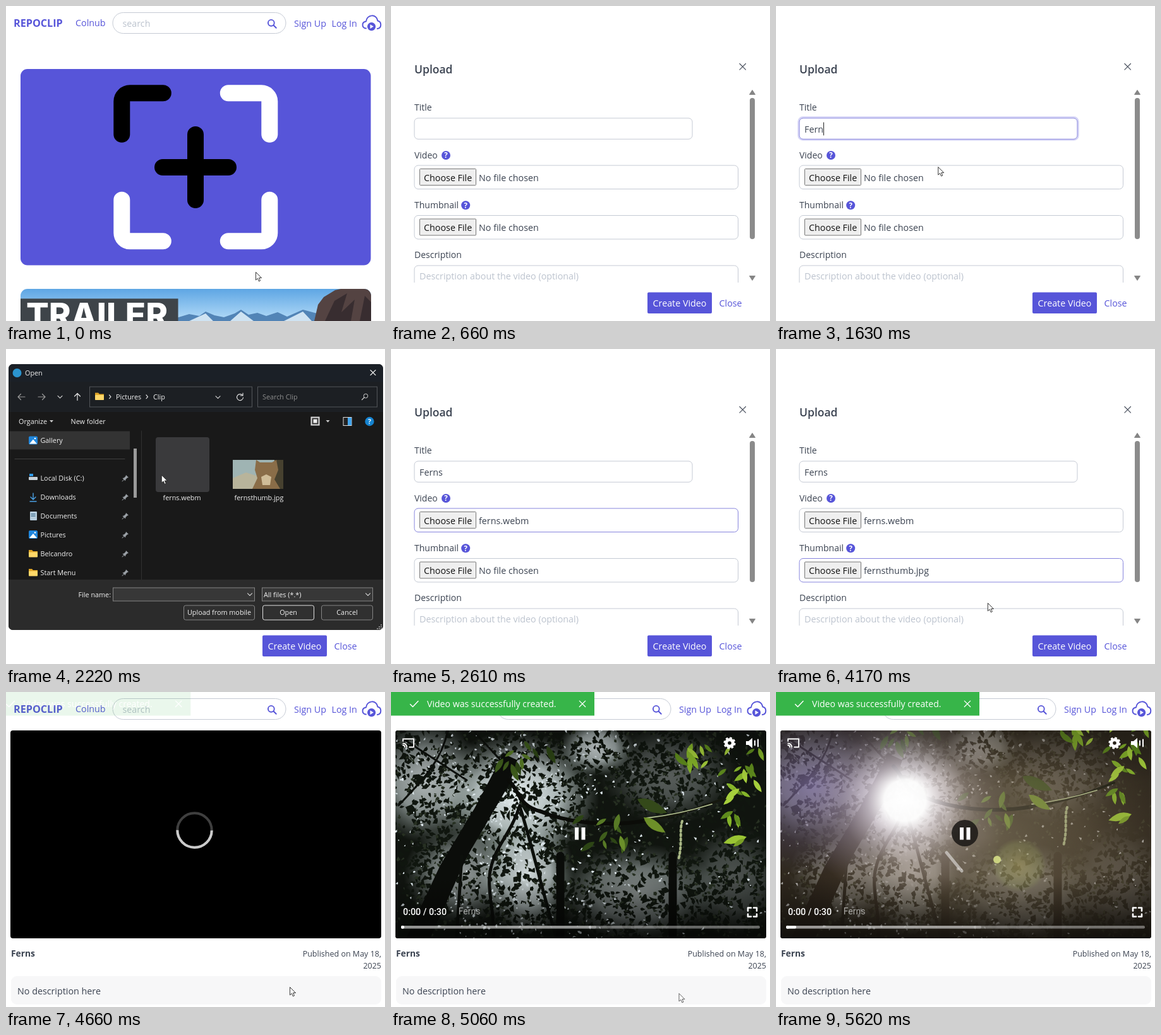
An HTML page that plays this animation: 600x500 px, repeating every 5710 ms.

```html
<!DOCTYPE html>
<html lang="en">
<head>
<meta charset="utf-8">
<title>Video upload</title>
<style>
html, body { margin: 0; width: 100%; height: 100%; overflow: hidden; background: #fff; }
svg { display: block; width: 600px; height: 500px; font: 14.3px "Open Sans", sans-serif; fill: #3b4351; }
text { white-space: pre; }
.link { fill: #5755d9; }
.hint { fill: #bcc3ce; }
.label { font-size: 14px; }
.line { fill: none; stroke-linecap: round; stroke-linejoin: round; }
.mid { text-anchor: middle; }
#dialog text { font-size: 10.8px; fill: #f2f2f2; }
#dialog .dim { fill: #8d8d8d; }
</style>
</head>
<body>
<svg id="stage" viewBox="0 0 600 500" xmlns="http://www.w3.org/2000/svg"></svg>
<script>
const LOOP = 5710;
const PURPLE = '#5755d9';
const TITLE = 'Ferns';
const VIDEO_FILE = 'ferns.webm';
const IMAGE_FILE = 'fernsthumb.jpg';

let seed = 11;
const rnd = () => (seed = (seed * 16807) % 2147483647) / 2147483647;

// Markup helpers
const text = (x, y, s, attrs = '') => `<text x="${x}" y="${y}" ${attrs}>${s}</text>`;
const rect = (x, y, w, h, fill, attrs = '') =>
  `<rect x="${x}" y="${y}" width="${w}" height="${h}" fill="${fill}" ${attrs}/>`;
const circle = (x, y, r, fill, attrs = '') => `<circle cx="${x}" cy="${y}" r="${r}" fill="${fill}" ${attrs}/>`;
const ellipse = (x, y, rx, ry, fill, attrs = '') =>
  `<ellipse cx="${x}" cy="${y}" rx="${rx}" ry="${ry}" fill="${fill}" ${attrs}/>`;
const shape = (d, fill, attrs = '') => `<path d="${d}" fill="${fill}" ${attrs}/>`;
const line = (d, color, width = 1, attrs = '') =>
  `<path class="line" d="${d}" stroke="${color}" stroke-width="${width}" ${attrs}/>`;
const group = (id, ...parts) => `<g id="${id}">${parts.join('')}</g>`;
const cross = (x, y, r, color, width) =>
  line(`M${x - r} ${y - r}l${2 * r} ${2 * r}m0 ${-2 * r}l${-2 * r} ${2 * r}`, color, width);
const stops = (...list) => list.map(([at, color, alpha = 1]) =>
  `<stop offset="${at}" stop-color="${color}" stop-opacity="${alpha}"/>`).join('');
const radial = (id, ...list) => `<radialGradient id="${id}">${stops(...list)}</radialGradient>`;
const vertical = (id, ...list) => `<linearGradient id="${id}" x2="0" y2="1">${stops(...list)}</linearGradient>`;

const defs = `<defs>
  <clipPath id="cardClip">${rect(23, 449, 555, 80, '#000', 'rx="11"')}</clipPath>
  <clipPath id="formClip">${rect(30, 130, 530, 309, '#000')}</clipPath>
  <clipPath id="videoClip">${rect(7, 61, 587, 330, '#000', 'rx="4"')}</clipPath>
  <clipPath id="dialogClip">${rect(4, 24, 593, 422, '#000', 'rx="7"')}</clipPath>
  <clipPath id="photoClip">${rect(359, 176, 80, 46, '#000')}</clipPath>
  ${vertical('sky', [0, '#5ea6e4'], [1, '#b5dcf8'])}
  ${vertical('shade', [0, '#000', .25], [.25, '#000', 0], [.7, '#000', 0], [1, '#000', .6])}
  ${radial('daylight', [0, '#e6eef0'], [.5, '#d3dfe0', .8], [1, '#9fb0aa', 0])}
  ${radial('sun', [0, '#fff'], [.2, '#fff', .97], [.36, '#f6eef8', .62], [.62, '#d9cbd6', .25], [1, '#bfb0c0', 0])}
  ${radial('haze', [0, '#7a6cae', .62], [1, '#5a4f80', 0])}
  ${radial('warmth', [0, '#a39578', .5], [.5, '#8f7f62', .36], [1, '#6b5840', 0])}
  ${radial('flare', [0, '#c9c05f', .3], [.8, '#a8b766', .2], [1, '#a8b766', 0])}
</defs>`;

// Site header and home page
const header = group('header',
  text(12, 33, 'REPOCLIP', 'class="link" font-size="16.2" font-weight="700"'),
  text(110, 32, 'Colnub', 'class="link"'),
  rect(169, 10.5, 274, 33, '#fff', 'rx="16.5" stroke="#c5cad4"'),
  text(184.5, 33, 'search', 'class="hint"'),
  circle(419.8, 26.8, 4.9, 'none', `stroke="${PURPLE}" stroke-width="1.9"`),
  line('M423.5 30.5l4.2 4.2', PURPLE, 2),
  text(456, 33, 'Sign Up', 'class="link"'),
  text(515.5, 33, 'Log In', 'class="link"'),
  line('M570 35.5C563 35 562.5 25.5 570 24.5C571 13 587 12 588.5 23.5C595 25 595 35 588 36', PURPLE, 2),
  circle(578.6, 32.6, 6.6, PURPLE), shape('M576.5 29.2v6.8l5.4-3.4z', '#fff'));

const corner = (sx, sy, color) =>
  line('M-117-52V-104.5A13 13 0 0 1-104-117.5H-51.5', color, 26,
    `transform="translate(300.3 255.8) scale(${sx} ${sy})"`);

const home = group('home',
  rect(23, 100, 554.5, 311.5, PURPLE, 'rx="11"'),
  corner(1, 1, '#000'), corner(-1, 1, '#fff'), corner(1, -1, '#fff'), corner(-1, -1, '#fff'),
  line('M248 256h104M300 204v104', '#000', 26),
  `<g clip-path="url(#cardClip)">`,
  rect(23, 449, 555, 51, 'url(#sky)'),
  shape('M270 495L290 489L306 492L316 485L330 491L345 494L362 488L372 482L384 490L398 487L412 492L430 486L445 493L470 482L500 490V500H270Z', '#5284b6'),
  shape('M290 500L316 488L328 500M355 500L372 485L392 500M440 500L470 485L484 500', '#cfe3f2'),
  shape('M488 500L494 474L503 462L521 451L530 449H578V500Z', '#544342'),
  shape('M505 500L520 468L540 456L531 486L552 466L546 500M560 500L568 460L578 470V500', '#382d30'),
  rect(23, 464.5, 249.5, 36, '#3e4449'),
  text(32, 510, 'TRAILER', 'fill="#fff" font-family="Inter, sans-serif" font-weight="800" font-size="53"'), '</g>');

// Upload form
const help = (x, y) => circle(x, y, 7, PURPLE) +
  text(x, y + 4.2, '?', 'class="mid" fill="#fff" font-size="11.5" font-weight="700"');
const label = (y, s) => text(37, y, s, 'class="label"');
const fileField = (id, y) =>
  rect(37, y, 512.5, 37.5, '#fff', `id="${id}Box" rx="6" stroke="#c5cad4"`) +
  rect(45.5, y + 5.5, 89, 26, '#efefef', 'stroke="#767676" rx="1"') +
  text(52, y + 24.5, 'Choose File', 'fill="#111"') + text(139, y + 24.5, '', `id="${id}Name"`);

const modal = group('modal',
  text(37, 107, 'Upload', 'font-size="17.5" font-weight="600"'),
  cross(556.7, 96.3, 4.8, '#4c5360', 1.2),
  rect(568, 146, 8, 224, '#8b8b8b', 'rx="4"'),
  shape('M572 133.5l4.5 7h-9zM572 435.5l4.5-7h-9z', '#858585', 'stroke="#858585" stroke-linejoin="round"'),
  label(166, 'Title'),
  rect(35.5, 176.5, 443, 36, 'none', 'id="titleRing" rx="7" stroke="#5755d9" stroke-opacity=".25" stroke-width="2.5"'),
  rect(37, 178, 440, 33.3, '#fff', 'id="titleBox" rx="6" stroke="#c5cad4"'),
  text(45, 201, '', 'id="titleText"'), line('M0 185v20', '#222', 1, 'id="caret"'),
  label(241.5, 'Video'), help(87, 237),
  label(321, 'Thumbnail'), help(118.2, 316.3),
  fileField('video', 253), fileField('thumb', 332.5),
  label(400, 'Description'),
  '<g clip-path="url(#formClip)">',
  rect(37, 412, 512.5, 70, '#fff', 'rx="6" stroke="#c5cad4"'),
  text(45, 434, 'Description about the video (optional)', 'class="hint"'), '</g>',
  rect(406, 454.5, 102, 33.5, PURPLE, 'rx="2"'),
  text(457, 476.5, 'Create Video', 'class="mid" fill="#fff"'),
  text(519.5, 476.5, 'Close', 'class="link"'));

// File dialog
const folder = (x, y) => shape(`M${x} ${y}h5l2 2h7v9h-14z`, '#e0a526') + rect(x, y + 3.5, 14, 8, '#ffd869', 'rx="1"');
const picture = (x, y) => rect(x, y, 14, 13, '#1f86dc', 'rx="2"') +
  shape(`M${x + 1} ${y + 12}l6-7l6 7z`, '#fff') + circle(x + 10, y + 3.5, 1.3, '#fff');
const pin = y => shape(`M190 ${y - 5}l4 4l-2 .5l-2.5 2.5l-.5 2.5l-2-2l-3 3l-.6-.6l3-3l-2-2l2.5-.5l2.5-2.5z`, '#9aa0a6');
const chevron = (x, y) => line(`M${x - 3.5} ${y - 1.7}l3.5 3.5l3.5-3.5`, '#d0d0d0', 1.2);
const outline = (x, y, w, h, fill, color, attrs = '') => rect(x + .5, y + .5, w, h, fill, `stroke="${color}" ${attrs}`);
const button = (x, w, name, color = '#858585') =>
  outline(x, 406.5, w, 23, '#303030', color, 'rx="3"') + text(x + w / 2 + .5, 422, name, 'class="mid"');

const sideItems = [
  ['Local Disk (C:)', rect(36, 203, 14, 5, '#c9d1d8', 'rx="1"') + rect(37, 198, 6, 4, '#2f9bec')],
  ['Downloads', line('M43 229v10m-4-4l4 4l4-4M38 242h10', '#4ba3e8', 1.4)],
  ['Documents', rect(38, 258, 11, 14, '#b6cddd', 'rx="1"') + line('M40 262h6m-6 3h6', '#4b7896', 1.5)],
  ['Pictures', picture(36, 288)],
  ['Belcandro', folder(36, 319)],
  ['Start Menu', folder(36, 349)],
];

const dialog = group('dialog', '<g clip-path="url(#dialogClip)">',
  rect(4, 24, 593, 422, '#191919'), rect(4, 24, 593, 76, '#1b2027'), rect(4, 52, 593, 48, '#1c1f23'),
  circle(17.5, 38, 7, '#2b94cf'), text(30, 42, 'Open'), cross(581, 37.5, 4, '#eee', 1.1),
  line('M30 76h-11m4.5-4.5l-4.5 4.5l4.5 4.5M51 76h11m-4.5-4.5l4.5 4.5l-4.5 4.5', '#9a9a9a', 1.2),
  chevron(85.5, 76), line('M113 81.5v-11m-4.5 4.5l4.5-4.5l4.5 4.5', '#e8e8e8', 1.2),
  outline(132, 59.5, 257, 32, 'none', '#53565a'), folder(141, 69.5),
  line('M163.5 73l2.5 2.8l-2.5 2.8M222 73l2.5 2.8l-2.5 2.8', '#ddd', 1.2),
  text(174, 79.5, 'Pictures'), text(233, 79.5, 'Clip'), chevron(335.5, 76.5),
  line('M374.5 73.5A5 5 0 1 0 375.5 77M375 70v4h-4', '#ddd', 1.2),
  outline(398, 59.5, 189, 32, 'none', '#53565a'), text(406, 80, 'Search Clip', 'class="dim"'),
  circle(569.5, 74.5, 3.3, 'none', 'stroke="#ccc"'), line('M567 77l-3.5 3.5', '#ccc', 1.2),
  text(20, 119, 'Organize'), shape('M69 113h6l-3 3.5z', '#ccc'), text(102.5, 119, 'New folder'),
  rect(483.5, 108.5, 12, 12, '#333', 'stroke="#ddd" stroke-width="2"'), rect(486.5, 111.5, 6, 6, '#eee'),
  shape('M506.5 113h6l-3 3.5z', '#ccc'),
  rect(534, 108.5, 13, 13, '#222', 'stroke="#ddd"'), rect(541, 109, 6, 12, '#42a5ed'),
  circle(575.5, 115, 7.2, '#1583d0'), text(575.5, 119, '?', 'class="mid" font-weight="700"'),
  rect(5.5, 130.5, 190.5, 29, '#333'), picture(36, 138.5), text(54.5, 149, 'Gallery'),
  line('M14 174.5h174', '#414141'), rect(202, 158, 5, 78, '#9a9a9a'), line('M214.5 130v236', '#303030'),
  ...sideItems.map(([name, icon], i) => icon + text(54.5, 209 + 30 * i, name) + pin(205 + 30 * i)),
  outline(229, 135.5, 98, 109, '#4c4c4c', '#858585', 'id="pickVideo"'),
  outline(351, 135.5, 98, 109, '#4c4c4c', '#858585', 'id="pickImage"'),
  rect(237, 140, 85, 87, '#3a3a3c', 'rx="4"'),
  text(278.5, 240, VIDEO_FILE, 'class="mid"'), text(400.5, 240, IMAGE_FILE, 'class="mid"'),
  '<g clip-path="url(#photoClip)">', rect(359, 176, 80, 46, '#9fb4b3'),
  shape('M359 205L380 196L399 202V222H359Z', '#b8b49b'), shape('M425 176H439V222H422Z', '#47412f'),
  shape('M396 176L402 180H421L428 176L431 192L425 207L434 222H390L398 205L394 192Z', '#8a6d48'),
  shape('M404 203L412 199L420 203L418 216H406Z', '#d0bd98'), '</g>',
  rect(4, 366, 593, 80, '#2b2b2b'),
  text(114.5, 393.5, 'File name:'),
  outline(169, 378.5, 224, 21, '#373737', '#858585'), text(172.5, 393.5, '', 'id="fileName"'), chevron(386, 389.5),
  outline(405, 378.5, 175, 21, '#373737', '#858585'), text(408, 393.5, 'All files (*.*)'), chevron(573, 389.5),
  button(281, 112, 'Upload from mobile'), button(406, 81, 'Open', '#e0e0e0'), button(499, 81, 'Cancel'),
  ...[0, 1, 2].flatMap(r => [0, 1, 2].filter(c => c + r > 1).map(c => rect(587 + 3 * c, 437 + 3 * r, 2, 2, '#8a8a8a'))),
  '</g>');

// Forest clip: daylight broken up by small dark foliage, then trunks, a branch and leaves
function foliage(count, size, color, density = () => 1) {
  let d = '';
  for (let i = 0; i < count; i++) {
    const x = 7 + rnd() * 587, y = 61 + rnd() * 330;
    if (rnd() > density(x, y)) continue;
    for (let k = 0; k < 5; k++) {
      const a = k * Math.PI / 2.5, r = size * (.3 + rnd() * rnd() * 1.7);
      d += `${k ? 'L' : 'M'}${(x + r * Math.cos(a)).toFixed(1)} ${(y + r * Math.sin(a)).toFixed(1)}`;
    }
    d += 'Z';
  }
  return shape(d, color);
}
const wave = (x, y) => Math.sin(x / 17 + Math.sin(y / 23) * 2) * Math.cos(y / 15 + Math.sin(x / 31) * 2);
const clumps = (x, y) => .6 + .4 * wave(x, y);
const gaps = (x, y) => (.15 + .85 * Math.exp(-(((x - 170) / 190) ** 2))) * (.45 - .45 * wave(x, y));

const leaf = (x, y, angle, size, color) =>
  shape(`M0 0Q${size * .45} ${size * .36} ${size} 0Q${size * .4} ${-size * .3} 0 0`, color,
    `transform="translate(${x} ${y}) rotate(${angle})"`);
const leafCluster = (x, y, w, h, count, size, colors) => Array.from({ length: count }, (_, i) =>
  leaf(x + (rnd() - .5) * w, y + (rnd() - .5) * h, 20 + rnd() * 130, size * (.7 + rnd() * .6), colors[i % colors.length])).join('');

const lime = ['#86b52a', '#5f8b1d', '#a6cf3c'], moss = ['#3f5d1c', '#2d4515', '#587a26'];
const day = (x, y, rx, ry, alpha = 1) => ellipse(x, y, rx, ry, 'url(#daylight)', `opacity="${alpha}"`);
const forest = group('forest',
  rect(7, 61, 587, 330, '#10140f'),
  day(200, 165, 130, 105), day(325, 88, 60, 45, .9), day(215, 290, 75, 100, .9), day(55, 140, 90, 100, .75),
  day(110, 290, 90, 80, .6), day(390, 320, 130, 80, .55), day(440, 130, 110, 80, .35), day(540, 300, 80, 90, .3),
  foliage(4200, 5, '#10160f', clumps), foliage(1500, 3, '#273022', clumps),
  foliage(1800, 2.4, '#dce6ea', gaps),
  shape('M178 98L200 108L188 145L120 262L62 391H24L78 275L132 185Z', '#0b0d0a'),
  line('M204 180C190 225 165 245 158 280C150 310 165 350 162 391', '#0b0d0a', 5),
  line('M205 185C225 250 235 300 262 391M112 260L104 391', '#0c0f0b', 5),
  line('M268 260V391M446 260V391', '#0a0c09', 13),
  line('M90 61C80 110 50 140 12 180M130 61L175 110M20 75L120 140', '#0d100c', 3),
  rect(7, 61, 587, 330, '#5c4835', 'id="warm"'),
  group('branch',
    line('M186 140C205 158 200 180 238 190C290 212 360 212 405 204', '#0b0c08', 6),
    line('M402 204C440 199 470 192 535 166', '#16180f', 4),
    line('M405 200C440 196 470 190 508 178', '#b9c795', 1.8),
    line('M461 205C456 220 462 240 455 266', '#a9b785', 4, 'stroke-dasharray="3 4"')),
  group('leaves',
    leafCluster(215, 95, 75, 45, 10, 24, moss), leafCluster(340, 215, 70, 50, 9, 22, moss),
    leaf(390, 170, 25, 52, '#34491a'), leaf(400, 199, 35, 42, '#6d8f29'), leaf(363, 228, 75, 26, '#6b8f2a'),
    leafCluster(475, 95, 55, 35, 10, 22, lime), leafCluster(555, 115, 55, 70, 11, 21, lime),
    leafCluster(548, 175, 30, 50, 8, 23, lime), leaf(563, 230, 165, 38, '#9bc534'), leaf(560, 233, 145, 22, '#7ba126')),
  group('sunlight',
    ellipse(330, 230, 310, 210, 'url(#warmth)'),
    ellipse(60, 150, 190, 140, 'url(#haze)'),
    circle(204, 172, 165, 'url(#sun)'),
    line('M270 255L294 284', '#fff', 5, 'opacity=".5"'), circle(385, 275, 43, 'url(#flare)'),
    circle(350, 266, 6, '#dce58a', 'opacity=".85"')));

const gear = circle(536, 81, 5.3, 'none', 'stroke="#fff" stroke-width="5"') +
  circle(536, 81, 8.3, 'none', 'stroke="#fff" stroke-width="2.5" stroke-dasharray="3.5 3.02"');
const controls = group('controls',
  rect(7, 61, 587, 330, 'url(#shade)'),
  line('M19 78v-3.5h17v13h-7M19 81.5a6 6 0 0 1 6 6M19 84.5a3 3 0 0 1 3 3', '#fff', 1.8), gear,
  shape('M562 78h4l6-5v16l-6-5h-4z', '#fff'), line('M576 77.5v7M581 75.5v11', '#fff', 2),
  line('M565 347.5v-5h5m4 0h5v5m0 5v4h-5m-4 0h-5v-4', '#fff', 2.6),
  text(19, 354, '0:00 / 0:30', 'fill="#fff" font-family="Roboto, sans-serif" font-weight="500" font-size="14.3"'),
  text(95, 353, '•  ' + TITLE, 'fill="#fff" fill-opacity=".6" font-family="Roboto, sans-serif" font-size="14"'),
  rect(16, 371, 568, 4.5, '#fff', 'opacity=".38" rx="2"'), rect(16, 371, 309, 4.5, '#fff', 'opacity=".3" rx="2"'),
  rect(16, 371, 3, 4.5, '#fff', 'id="played" rx="2"'), circle(18.5, 373.2, 2.5, '#fff'),
  circle(299, 224, 21, '#191715', 'id="pauseDisc"'),
  rect(291, 215, 6, 19.5, '#fff'), rect(301.5, 215, 6, 19.5, '#fff'));

const watch = group('watch',
  '<g clip-path="url(#videoClip)">', rect(7, 61, 587, 330, '#000'),
  group('spinner', circle(298.5, 219.5, 27.2, 'none', 'stroke="#3f3f3f" stroke-width="4"'),
    shape('M271.3 219.5a27.2 27.2 0 0 0 54.4 0', 'none', 'stroke="#cbcbcb" stroke-width="4"')),
  group('clip', forest, controls), '</g>',
  text(8, 420, TITLE, 'font-weight="700" font-size="13.8"'),
  text(594, 420, 'Published on May 18,', 'text-anchor="end" font-size="12.5"'),
  text(594, 439, '2025', 'text-anchor="end" font-size="12.5"'),
  rect(8, 451, 586, 45, '#f7f7f8', 'rx="9"'), text(18, 480, 'No description here'));

const toast = group('toast',
  rect(0, 0, 322, 37.5, '#37b549'), line('M30.5 19.5l4 4l8.5-9', '#fff', 1.5),
  text(57, 24, 'Video was successfully created.', 'fill="#fff" font-size="14.1"'), cross(303, 18.8, 4.7, '#fff', 1.3));

const cursor = group('cursor',
  shape('M.5 .5V13L3.4 10.4L5.4 15L7.5 14L5.5 9.6H9.5Z', '#fff', 'stroke="#222" stroke-width=".9"'));

document.getElementById('stage').innerHTML =
  defs + rect(0, 0, 600, 500, '#fff') + header + home + watch + toast + modal + dialog + cursor;

// Animation
const el = id => document.getElementById(id);
const set = (id, name, value) => el(id).setAttribute(name, value);
const show = (id, alpha) => {
  el(id).style.display = alpha > 0 ? '' : 'none';
  set(id, 'opacity', +alpha);
};
const write = (id, value) => { if (el(id).textContent !== value) el(id).textContent = value; };
const ramp = (t, from, to) => Math.min(1, Math.max(0, (t - from) / (to - from)));
const easeOut = p => 1 - (1 - p) ** 2;
const within = (t, from, to) => t >= from && t < to;

// Each run: [time, x, y] points; the pointer is hidden between runs
const pointerRuns = [
  [[0, 395, 422], [160, 395, 422]],
  [[900, 258, 182], [1060, 258, 196], [1460, 257, 228], [1630, 257, 255], [1850, 92, 266], [2000, 150, 240], [2300, 280, 185], [2530, 280, 185]],
  [[2690, 100, 300], [2830, 96, 346], [3000, 200, 300], [3420, 378, 200], [3580, 380, 197], [3740, 380, 197]],
  [[4160, 330, 400], [4420, 445, 468], [4660, 449, 468], [5060, 455.5, 478], [5180, 456, 479]],
];
const typing = [1140, 1260, 1400, 1550, 1710];

function movePointer(t) {
  const run = pointerRuns.find(r => within(t, r[0][0], r[r.length - 1][0]));
  show('cursor', run ? 1 - .9 * ramp(t, 5020, 5180) : 0);
  if (!run) return;
  const i = run.findIndex(p => p[0] > t), [t0, x0, y0] = run[i - 1], [t1, x1, y1] = run[i];
  const p = ramp(t, t0, t1);
  set('cursor', 'transform', `translate(${x0 + (x1 - x0) * p} ${y0 + (y1 - y0) * p})`);
}

function render(t) {
  const watching = t >= 4660;
  const pageAlpha = 1 - ramp(t, 320, 480);
  show('header', watching ? 1 : pageAlpha);
  show('home', watching ? 0 : pageAlpha);

  const enter = easeOut(ramp(t, 340, 600));
  show('modal', watching ? 0 : enter);
  set('modal', 'transform', `translate(0 ${-26 * (1 - enter)})`);
  const typed = typing.filter(at => t >= at).length;
  const titleFocus = within(t, 980, 1870);
  write('titleText', TITLE.slice(0, typed));
  show('titleRing', titleFocus);
  show('caret', titleFocus);
  if (titleFocus) set('caret', 'transform', `translate(${45.5 + (typed ? el('titleText').getComputedTextLength() : 0)} 0)`);
  const border = on => on ? '#8684dd' : '#c5cad4';
  set('titleBox', 'stroke', border(titleFocus));
  set('videoBox', 'stroke', border(within(t, 1870, 2850)));
  set('thumbBox', 'stroke', border(within(t, 2850, 4240)));
  write('videoName', t < 2530 ? 'No file chosen' : VIDEO_FILE);
  write('thumbName', t < 3740 ? 'No file chosen' : IMAGE_FILE);

  const first = within(t, 1910, 2530), second = within(t, 2890, 3740);
  show('dialog', first ? ramp(t, 1890, 2000) : second ? ramp(t, 2870, 2980) : 0);
  const videoPicked = first && t >= 2300, imagePicked = second && t >= 3480;
  show('pickVideo', videoPicked);
  show('pickImage', imagePicked);
  write('fileName', videoPicked ? VIDEO_FILE : imagePicked ? IMAGE_FILE : '');

  show('watch', watching);
  show('toast', watching ? ramp(t, 4635, 4900) : 0);
  set('toast', 'transform', `translate(${-30 * (1 - easeOut(ramp(t, 4660, 4940)))} 0)`);
  show('spinner', t < 4940);
  set('spinner', 'transform', `rotate(${(t - 4660) * .36} 298.5 219.5)`);
  show('clip', t >= 4940);
  const light = ramp(t, 5140, 5600);
  show('sunlight', light);
  show('warm', .4 * light);
  set('branch', 'transform', `translate(0 ${-22 * light})`);
  set('leaves', 'transform', `translate(0 ${-36 * light})`);
  show('pauseDisc', .85 * ramp(t, 5060, 5220));
  set('played', 'width', 3 + 13 * ramp(t, 5060, 5620));
  movePointer(t);
}

const start = performance.now();
function tick() {
  render((performance.now() - start) % LOOP);
  requestAnimationFrame(tick);
}
tick();
</script>
</body>
</html>
```
